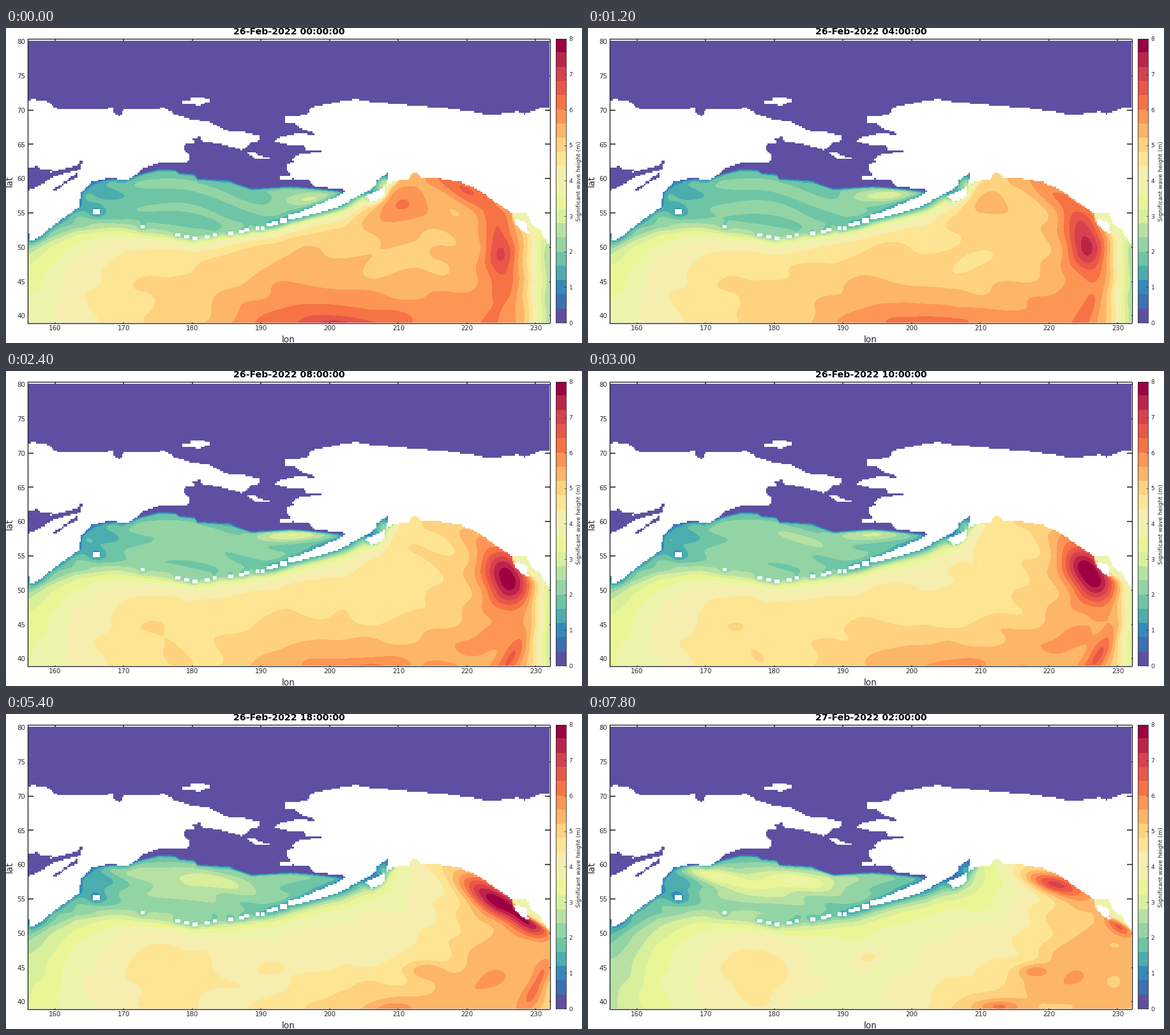
Animation of 902x494 px, one loop 8 s. Source, as a matplotlib script:

```python
import numpy as np
import matplotlib.pyplot as plt
from matplotlib.animation import FuncAnimation
from matplotlib.colors import ListedColormap
from matplotlib.path import Path

plt.rcParams["font.family"] = "DejaVu Sans"

W, H, DPI = 902, 494, 100
LEFT, RIGHT, TOP, BOTTOM = 34, 851, 18, 462
DATA_TOP = 21
DEG = 10.75           # pixels per degree
CELL = DEG / 4        # land mask cell
STEPS = 14            # one map every two hours
INK = "#262626"

COLORS = ["#5e4fa2", "#3c70b4", "#348abc", "#4badae", "#6dc5a6",
          "#93d4a5", "#b7e1a2", "#d8ef9c", "#eaf596", "#eef3ac",
          "#f5eeae", "#fee594", "#fed27f", "#fdb567", "#fd9654",
          "#f77244", "#ea5648", "#d9404e", "#bd2249", "#9e0142"]
CMAP = ListedColormap(COLORS)

# Coastlines, in stage pixels
SIBERIA = [
    (30, 115), (44, 113), (66, 117), (81, 129), (167, 127), (170, 135),
    (180, 139), (184, 128), (250, 127), (263, 135), (290, 144), (320, 149),
    (346, 162), (370, 163), (399, 171), (395, 178), (384, 180), (376, 188),
    (369, 192), (345, 185), (308, 178), (304, 172), (293, 175), (295, 181),
    (279, 184), (277, 190), (287, 199), (288, 207), (283, 211), (240, 213),
    (213, 221), (208, 228), (190, 239), (160, 236), (133, 243), (117, 258),
    (115, 280), (102, 290), (92, 297), (66, 316), (52, 328), (39, 335),
    (36, 332), (38, 322), (30, 318)]
ALASKA = [
    (856, 126), (836, 127), (812, 136), (802, 132), (752, 138), (745, 134),
    (690, 127), (573, 117), (548, 113), (530, 115), (509, 119), (480, 125),
    (470, 137), (438, 140), (437, 149), (452, 151), (464, 160), (482, 165),
    (482, 170), (462, 165), (424, 174), (421, 178), (440, 184), (465, 184),
    (470, 192), (494, 192), (494, 196), (460, 198), (448, 207), (451, 212),
    (440, 214), (438, 220), (452, 240), (475, 239), (484, 249), (528, 253)]
GULF_COAST = [
    (531, 258), (500, 272), (460, 289), (453, 294), (458, 298), (500, 287),
    (522, 280), (545, 267), (566, 256), (578, 249), (580, 240), (597, 229),
    (598, 236), (594, 248), (605, 242), (632, 237), (635, 229), (643, 229),
    (650, 235), (680, 237), (715, 243), (740, 254), (765, 272), (792, 290),
    (815, 290), (823, 306), (836, 317), (847, 335), (856, 343)]
ISLANDS = [
    [(276, 116), (288, 115), (289, 111), (303, 109), (318, 113), (318, 117),
     (304, 122), (277, 121)],
    [(378, 197), (392, 197), (396, 202), (413, 203), (411, 207), (388, 205)],
    [(561, 263), (578, 258), (592, 249), (592, 262), (584, 269), (572, 273)],
    [(794, 300), (814, 303), (818, 322), (809, 319), (800, 310)],
    [(430, 232), (447, 233), (447, 238), (429, 239)],
    [(137, 285), (147, 285), (147, 293), (137, 293)]]
BAYS = [
    [(30, 220), (49, 218), (53, 223), (72, 222), (70, 227), (113, 216),
     (114, 210), (119, 210), (118, 222), (78, 233), (48, 249), (30, 257)],
    [(113, 226), (113, 234), (92, 245), (84, 252), (70, 256), (98, 238)]]
ISLETS = [214, 270, 283, 296, 314, 327, 353, 369, 377, 394, 402, 414, 422,
          434, 449, 457]

# Wave height along the open sea: x, first value, last value, pace
PROFILE = [(34, 3.4, 2.3, 2.0), (100, 4.15, 3.4, 1.8), (190, 4.7, 4.1, 1.4),
           (300, 4.9, 4.0, 0.9), (430, 5.35, 3.8, 0.9), (590, 5.0, 4.0, 0.6),
           (700, 5.1, 4.4, 0.8), (750, 5.4, 5.1, 1.0), (851, 5.4, 5.2, 1.0)]

# Moving crests as key points: time, x, y, height, long axis, short axis, tilt
STORM = [(0, 774, 350, 1.4, 42, 18, 82), (.31, 785, 326, 2.6, 32, 24, 60),
         (.54, 783, 303, 2.9, 48, 17, 38), (1, 726, 266, 2.2, 36, 11, 17)]
OFFSHOOT = [(.35, 815, 326, 0, 30, 13, 38), (.75, 826, 328, 2, 24, 13, 36),
            (1, 832, 328, 1.6, 18, 10, 42)]
COAST_RIDGE = [(0, 712, 248, 1.2, 42, 16, 35), (.4, 735, 268, 0, 42, 16, 35)]
NORTH_GULF = [(0, 610, 275, 1.0, 42, 32, 0), (.31, 612, 270, .1, 46, 34, 0),
              (1, 612, 262, -.9, 46, 36, 0)]
SOUTH_BAND = [(0, 540, 472, 1.25, 140, 45, 0), (1, 600, 472, .9, 75, 45, 0)]
SOUTH_CREST = [(0, 520, 463, .6, 30, 8, 0), (.5, 590, 463, .2, 30, 8, 0),
               (1, 642, 459, 1.0, 22, 7, 0)]
EAST_RIDGE = [(0, 756, 462, .5, 30, 10, -58), (.54, 822, 432, 1.3, 38, 10, -58),
              (1, 856, 400, .3, 36, 10, -70)]
GULF_BAND = [(0, 725, 415, .2, 60, 28, -15), (1, 725, 415, .7, 60, 28, -25)]
GULF_SPOT = [(.3, 635, 404, 0, 20, 9, 0), (.69, 658, 402, .7, 20, 9, 0),
             (1, 697, 402, .9, 17, 8, 0)]
WEST_SPOT = [(.6, 395, 403, 0, 16, 9, -10), (1, 440, 381, .7, 16, 9, -10)]
WEST_RISE = [(0, 250, 400, 0, 45, 50, 0), (1, 268, 395, .75, 42, 45, 0)]
# The same for the sea north of the island chain
GYRE = [(0, 145, 268, -.4, 32, 28, 0), (1, 140, 272, -.7, 24, 24, 0)]
INFLOW = [(0, 170, 308, .4, 45, 10, 0), (1, 155, 310, .3, 45, 10, 0)]
NORTH_STREAK = [(.6, 190, 247, 0, 40, 10, 10), (1, 195, 254, 1.5, 42, 9, 14)]
MID_STREAK = [(.2, 290, 262, .1, 70, 14, 8), (1, 320, 261, 1.4, 62, 12, 2)]
MID_RISE = [(0, 270, 288, 0, 90, 24, 0), (1, 285, 285, .6, 80, 22, -6)]
EAST_STREAK = [(0, 478, 269, 1.1, 36, 8, -4), (.31, 450, 258, 1.2, 42, 7, -4),
               (.54, 440, 255, 0, 36, 8, -4)]
CRESTS = [STORM, OFFSHOOT, COAST_RIDGE, NORTH_GULF, SOUTH_BAND, SOUTH_CREST,
          EAST_RIDGE, GULF_BAND, GULF_SPOT, WEST_SPOT, WEST_RISE, GYRE,
          INFLOW, NORTH_STREAK, MID_STREAK, MID_RISE, EAST_STREAK]

# Pixel centres of the map
X, Y = np.meshgrid(np.arange(LEFT, RIGHT) + 0.5,
                   np.arange(DATA_TOP, BOTTOM) + 0.5)


def curve(*points):
    return np.interp(X, *zip(*points))


def ramp(v):
    return 1 / (1 + np.exp(-np.clip(v, -40, 40)))


def blur_matrix(n, sigma):
    i = np.arange(n)
    g = np.exp(-((i[:, None] - i) / sigma) ** 2 / 2)
    return g / g.sum(1, keepdims=True)


def land_mask():
    cols = np.arange(0, RIGHT - LEFT, CELL)
    rows = np.arange(0, BOTTOM - DATA_TOP, CELL)
    cx, cy = np.meshgrid(LEFT + cols + CELL / 2, DATA_TOP + rows + CELL / 2)
    centres = np.column_stack([cx.ravel(), cy.ravel()])

    def inside(shape):
        return Path(shape).contains_points(centres).reshape(cx.shape)

    land = inside(SIBERIA) | inside(ALASKA + GULF_COAST)
    for bay in BAYS:
        land &= ~inside(bay)
    for island in ISLANDS:
        land |= inside(island)
    for x in ISLETS:
        y = np.interp(x, [214, 295, 372, 402, 457], [311, 329, 318, 313, 294])
        w, h = (5.5, 3.2) if x > 405 else (3.6, 2.7)
        land |= (abs(cx - x) < w) & (abs(cy - y) < h)
    row = ((Y - DATA_TOP) / CELL).astype(int)
    col = ((X - LEFT) / CELL).astype(int)
    return land[row, col]


LAND = land_mask()
ROWS, COLS = LAND.shape

# Line of the island chain, and the edge of the ice
arc = curve((34, 341), (70, 324), (110, 312), (180, 313), (230, 320),
            (290, 328), (350, 322), (420, 314), (450, 304), (530, 284),
            (575, 260), (600, 236), (660, 100))
ice = curve((108, 282), (116, 256), (135, 241), (190, 235), (240, 223),
            (265, 224), (272, 229), (295, 231), (300, 238), (350, 241),
            (385, 253), (445, 249), (485, 252), (535, 257), (545, 190))
lee = curve((780, 0), (793, 296), (820, 319), (851, 336))

OPEN_SEA = ramp((Y - arc) / 5)
CHAIN_SHADE = 1.6 * np.exp(-np.clip(Y - arc, 0, None) / 20)
ICE_FREE = ramp((Y - ice) / 1.1)
LEE = ramp((lee - Y) / 3)
near_land = blur_matrix(ROWS, 5) @ LAND @ blur_matrix(COLS, 5)
COAST_DRAG = 1 - 0.9 * near_land * ramp((arc + 25 - Y) / 6)

WARPED_X = X + 9 * np.sin(Y / 23 + X / 60) + 4 * np.sin(Y / 9 - X / 35)
OPEN_RIPPLE = 0.05 * (np.sin(X / 17 + 2 * np.sin(Y / 19))
                      + np.sin(Y / 9 + 2 * np.sin(X / 31)))
INNER_RIPPLE = 0.14 * np.sin((Y - X / 5) / 6 + 1.6 * np.sin(X / 37))
SMOOTH = blur_matrix(COLS, 22)


def open_sea(t):
    x, first, last, pace = np.array(PROFILE).T
    line = np.interp(X[0], x, first + (last - first) * t ** pace)
    z = np.interp(WARPED_X, X[0], SMOOTH @ line)
    east_edge = 831 + 90 * t * t
    return z - CHAIN_SHADE - 3.4 * ramp((X - east_edge) / 11) + OPEN_RIPPLE


def bump(path, t):
    times, *params = np.array(path, float).T
    x, y, height, long, short, tilt = [np.interp(t, times, p) for p in params]
    c, s = np.cos(np.radians(tilt)), np.sin(np.radians(tilt))
    u = ((X - x) * c + (Y - y) * s) / long
    v = ((Y - y) * c - (X - x) * s) / short
    return height * np.exp(-(u * u + v * v) / 2)


def wave_height(step):
    t = step / (STEPS - 1)
    z = (1.9 + INNER_RIPPLE) * (1 - OPEN_SEA) + open_sea(t) * OPEN_SEA
    z += sum(bump(path, t) for path in CRESTS)
    z = (z * (1 - LEE) + 3.6 * LEE) * COAST_DRAG
    return np.ma.array(np.clip(z, 0.5, 8) * ICE_FREE, mask=LAND)


MAPS = [wave_height(step) for step in range(STEPS)]


def pt(px):
    return px * 72 / DPI


fig = plt.figure(figsize=(W / DPI, H / DPI), dpi=DPI, facecolor="white")


def add_axes(x0, y0, x1, y1):
    return fig.add_axes([x0 / W, 1 - y1 / H, (x1 - x0) / W, (y1 - y0) / H])


def label(x, y, text, size, **style):
    return fig.text(x / W, 1 - y / H, text, fontsize=pt(size), ha="center",
                    va="center", **style)


ax = add_axes(LEFT, TOP, RIGHT, BOTTOM)
image = ax.imshow(MAPS[0], cmap=CMAP, vmin=0, vmax=8, aspect="auto",
                  interpolation="nearest", zorder=1,
                  extent=(LEFT, RIGHT, BOTTOM, DATA_TOP))
ax.set_xlim(LEFT, RIGHT)
ax.set_ylim(BOTTOM, TOP)
for spine in ax.spines.values():
    spine.set_position(("outward", pt(0.5)))
lons, lats = range(160, 231, 10), range(40, 81, 5)
ax.set_xticks([LEFT + DEG * (lon - 156) for lon in lons], lons)
ax.set_yticks([BOTTOM - DEG * (lat - 39) for lat in lats], lats)
ax.set_axisbelow(True)
ax.tick_params(direction="in", top=True, right=True, length=pt(8.5),
               width=pt(1.6), pad=pt(3.5), labelsize=pt(10.2),
               color=INK, labelcolor=INK)

bar = add_axes(861, 17, 877, BOTTOM)
bar.imshow(np.arange(20)[:, None], cmap=CMAP, aspect="auto", origin="lower",
           interpolation="nearest", extent=(0, 1, 0, 8))
bar.set_xticks([])
bar.set_yticks(range(9))
bar.yaxis.tick_right()
bar.tick_params(direction="in", length=pt(3), width=pt(0.7), pad=pt(4.5),
                labelsize=pt(9), color=INK, labelcolor=INK)

for axes, width in ((ax, 1.4), (bar, 0.8)):
    for spine in axes.spines.values():
        spine.set(color=INK, linewidth=pt(width))

title = label(443, 6.5, "", 14.1, weight="bold", color="black")
label(442.5, 489, "lon", 13.8, color=INK)
label(6, 240.5, "lat", 13.8, color=INK, rotation=90)
label(897, 240, "Significant wave height (m)", 9, color=INK, rotation=90)


def update(frame):
    step = frame // 3
    days, hour = divmod(2 * step, 24)
    image.set_data(MAPS[step])
    title.set_text(f"{26 + days}-Feb-2022 {hour:02d}:00:00")
    return image, title


anim = FuncAnimation(fig, update, frames=40, interval=200, repeat=True,
                     repeat_delay=0)
plt.show()
```
